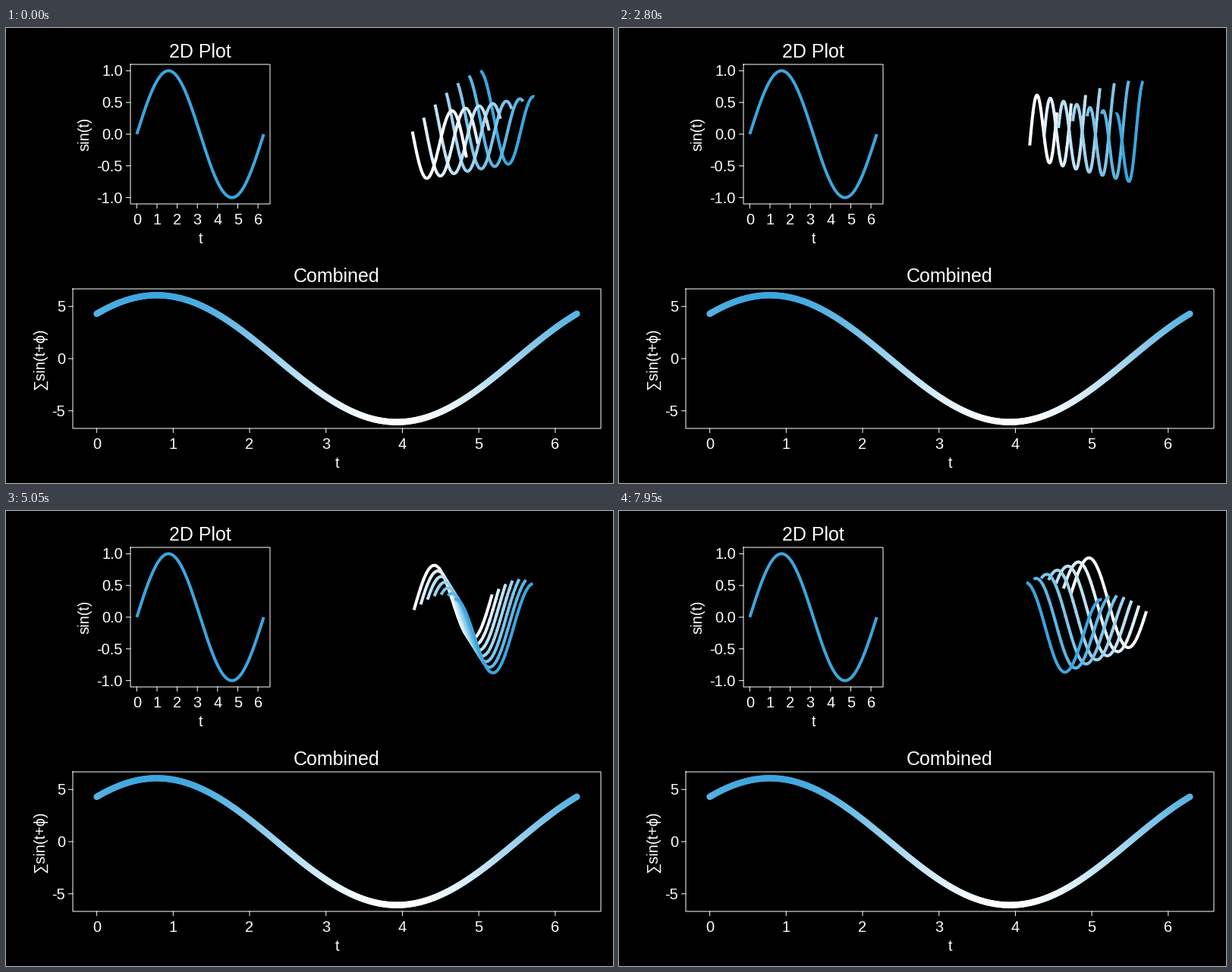
Recreate the animation shown at these times as a matplotlib script. Size 800 by 600 pixels, loop 8000 ms.

```python
import numpy as np
import matplotlib.pyplot as plt
from matplotlib.animation import FuncAnimation
from matplotlib.collections import LineCollection

W, H, DPI = 800, 600, 100
PT = 72 / DPI                       # points per pixel
FRAMES, INTERVAL = 160, 50
BLUE = np.array([60, 166, 222]) / 255
TAU = 2 * np.pi

plt.rcParams["font.family"] = ["Liberation Sans", "DejaVu Sans"]
fig = plt.figure(figsize=(W / DPI, H / DPI), dpi=DPI, facecolor="black")
ax = fig.add_axes([0, 0, 1, 1])
ax.set_xlim(0, W)
ax.set_ylim(H, 0)
ax.axis("off")


def shade(f):
    """Blend from white (0) to blue (1)."""
    f = np.asarray(f)[..., None]
    return (1 - f) + f * BLUE


def label(x, y, s, size=20, ha="center", va="baseline", rot=0):
    ax.text(x, y, s, fontsize=size * PT, color="white", ha=ha, va=va,
            rotation=rot, rotation_mode="anchor")


def rule(xs, ys):
    ax.plot(xs, ys, color="white", lw=PT, snap=False,
            solid_capstyle="projecting", solid_joinstyle="miter")


def panel(x0, y0, x1, y1, peak, title, yticks, yname, yname_x):
    """Draw a framed plot and return its data-to-pixel mapping."""
    def to_px(t, v):
        w, h = (x1 - x0) / 1.1, (y1 - y0) / 1.1
        return x0 + w * (0.05 + t / TAU), (y0 + y1) / 2 - h * v / (2 * peak)

    rule([x0, x1, x1, x0, x0], [y0, y0, y1, y1, y0])
    for k in range(7):
        x = to_px(k, 0)[0]
        rule([x, x], [y1, y1 + 5.5])
        label(x, y1 + 27, str(k))
    for v, s in yticks:
        y = to_px(0, v)[1]
        rule([x0 - 5.5, x0], [y, y])
        label(x0 - 10, y + 7, s, ha="right")
    mid = (x0 + x1) / 2
    label(mid, y0 - 9, title, 25)
    label(mid, y1 + 52, "t")
    label(yname_x, (y0 + y1) / 2, yname, rot=90)
    return to_px


# Single sine
t = np.linspace(0, TAU, 401)
to_px = panel(164, 48, 348, 232, 1, "2D Plot",
              [(v, f"{v:.1f}") for v in (-1, -0.5, 0, 0.5, 1)], "sin(t)", 109)
ax.plot(*to_px(t, np.sin(t)), color=BLUE, lw=4 * PT, solid_capstyle="butt")

# Sum of all phases
phases = np.linspace(0, np.pi / 2, 7)
total = np.sin(t[:, None] + phases).sum(axis=1)
peak = total.max()
to_px = panel(88, 344, 784, 528, peak, "Combined",
              [(v, str(v)) for v in (-5, 0, 5)], "∑sin(t+ϕ)", 50)
ax.scatter(*to_px(t, total), s=(8.5 * PT) ** 2, linewidths=0,
           c=shade((total + peak) / (2 * peak)))

# Rotating 3D view, each curve cut into chunks for depth sorting
CX, CY, HALF = 616, 140, 92
ELEV = np.pi / 8
N, STEP = 200, 8
ts = np.linspace(0, TAU, N + 1)
pos = (2 * phases / phases[-1] - 1)[:, None] / 1.1 + 0 * ts
along = (2 * ts / TAU - 1)[None, :] / 1.1 + 0 * pos
height = np.sin(ts[None, :] + phases[:, None]) / 1.1
starts = range(0, N, STEP)
tints = np.repeat(shade(np.linspace(0, 1, 7)), len(starts), axis=0)

waves = LineCollection([], linewidths=4 * PT, capstyle="butt", joinstyle="round")
ax.add_collection(waves, autolim=False)


def draw(i):
    az = np.radians(231.5 + i)
    c, s = np.cos(az), np.sin(az)
    ce, se = np.cos(ELEV), np.sin(ELEV)
    unit = HALF / (se * (abs(c) + abs(s)) + ce)   # the box always fills the height
    near = pos * c + along * s
    x = CX + unit * (along * c - pos * s)
    y = CY - unit * (height * ce - near * se)
    depth = near * ce + height * se
    pts = np.stack([x, y], axis=-1)
    chunks, keys = [], []
    for k in range(len(phases)):
        for a in starts:
            chunks.append(pts[k, a:a + STEP + 2])
            keys.append(depth[k, a:a + STEP + 1].mean())
    order = np.argsort(keys)
    waves.set_segments([chunks[j] for j in order])
    waves.set_color(tints[order])
    return (waves,)


anim = FuncAnimation(fig, draw, frames=FRAMES, interval=INTERVAL,
                     init_func=lambda: draw(0), repeat=True, repeat_delay=0)
plt.show()
```
